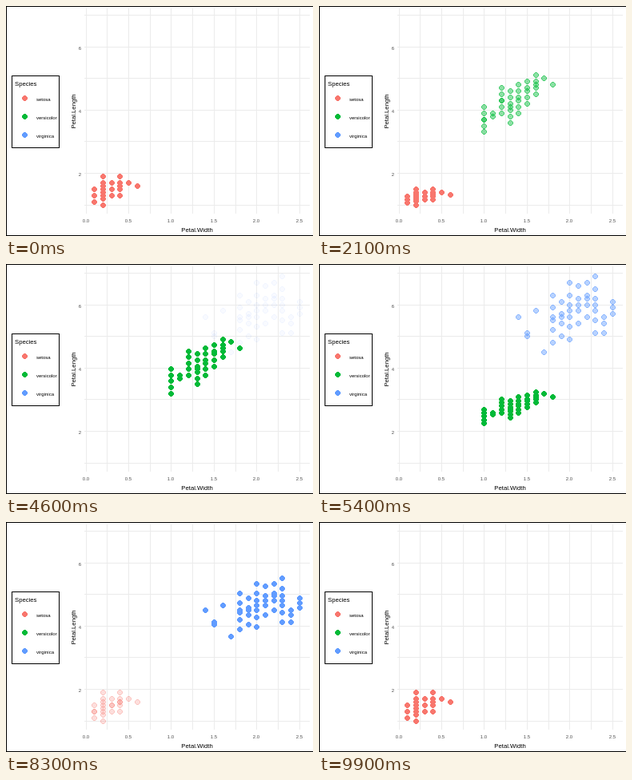
An HTML page with a canvas that plays this animation: 384x288 px, repeating every 10 s.

```html
<!DOCTYPE html>
<html lang="en">
<head>
<meta charset="utf-8">
<title>Iris petals by species</title>
<style>
  html, body { margin: 0; width: 100%; height: 100%; overflow: hidden; background: #fff; }
  canvas, svg { position: absolute; left: 0; top: 0; width: 384px; height: 288px; }
  text { font: 6px "Liberation Sans", Arial, sans-serif; }
  .title { font-size: 7.7px; }
  .tick { fill: #4d4d4d; }
</style>
</head>
<body>
<canvas id="plot" width="384" height="288"></canvas>
<svg id="labels" viewBox="0 0 384 288">
  <text class="title" x="239" y="283" text-anchor="middle">Petal.Width</text>
  <text class="title" transform="translate(87 132) rotate(-90)" text-anchor="middle">Petal.Length</text>
  <text class="title" x="11" y="100">Species</text>
</svg>
<script>
const ctx = document.getElementById('plot').getContext('2d');
const labels = document.getElementById('labels');
const LOOP = 10000, FRAME = 100, BASE = 1;

// The outline of each cloud: shortest and longest petal (mm) for each width,
// widths rising by 1 mm from `first`. `gap` is the usual distance between dots.
const species = [
  { name: 'setosa', color: '#F8766D', first: 1, gap: 1.4,
    spans: [[11, 15], [10, 19], [13, 17], [13, 19], [17, 17], [16, 16]] },
  { name: 'versicolor', color: '#00BA38', first: 10, gap: 1.8,
    spans: [[33, 41], [38, 39], [39, 47], [36, 46], [39, 48], [42, 49], [45, 51], [50, 50], [48, 48]] },
  { name: 'virginica', color: '#619CFF', first: 14, gap: 3,
    spans: [[56, 56], [50, 51], [58, 58], [45, 45], [48, 63], [50, 61],
            [49, 67], [54, 66], [56, 67], [51, 69], [51, 56], [57, 61]] }
];

// Fills a span with whole lengths that crowd towards its middle.
function spread([low, high], gap) {
  const steps = Math.ceil((high - low) / gap);
  return Array.from({ length: steps + 1 }, (_, i) => {
    const u = steps ? i / steps : 0;
    return Math.round(low + (high - low) * (u + 0.08 * Math.sin(2 * Math.PI * u)));
  });
}

for (const s of species) {
  s.points = s.spans.flatMap((span, i) =>
    spread(span, s.gap).map(length => ({ width: (s.first + i) / 10, length: length / 10 })));
}

// Each transition maps its step number to progress 0..1.
const transitions = [
  { start: 1200, progress: k => k / 22 },
  { start: 4600, progress: k => (k < 9 ? 1 + (k - 1) * 9 / 8 : k + 1) / 22 },
  { start: 7900, progress: k => k / 21 }
];

const xOf = width => Math.floor(100 + 106.95 * width);
const yOf = length => Math.floor(209.4 - 39.6 * (length - 2));

function addText(content, x, y, anchor, className = '') {
  const el = document.createElementNS('http://www.w3.org/2000/svg', 'text');
  el.setAttribute('x', x);
  el.setAttribute('y', y);
  el.setAttribute('text-anchor', anchor);
  el.setAttribute('class', className);
  el.textContent = content;
  labels.append(el);
}

for (let w = 0; w <= 2.5; w += 0.5) addText(w.toFixed(1), xOf(w), 271, 'middle', 'tick');
for (const l of [2, 4, 6]) addText(l, 94, yOf(l) + 3.5, 'end', 'tick');
species.forEach((s, i) => addText(s.name, 38, 119 + 23 * i, 'start'));

// A disc of whole pixels, without smoothed edges.
function addDisc(x, y, r) {
  for (let dy = -r; dy <= r; dy++) {
    const half = Math.min(r, r + 1 - Math.abs(dy));
    ctx.rect(x - half, y + dy, 2 * half + 1, 1);
  }
}

// Fill and outline overlap, so translucent dots show a darker rim.
function dot(x, y) {
  ctx.beginPath();
  addDisc(x, y, 3);
  ctx.fill();
  addDisc(x, y, 2);
  ctx.fill('evenodd');
}

function setColor(color, alpha = 1) {
  ctx.fillStyle = color;
  ctx.globalAlpha = alpha;
}

function drawBackground() {
  setColor('#fff');
  ctx.fillRect(0, 0, 384, 288);
  setColor('#ebebeb');
  for (let w = 0; w <= 2.5; w += 0.25) ctx.fillRect(xOf(w), 3, 1, 257);
  for (let l = 1; l <= 7; l++) ctx.fillRect(98, yOf(l), 282, 1);
  ctx.strokeRect(0.5, 0.5, 384, 287);
  ctx.strokeRect(7.5, 87.5, 59, 90);
  species.forEach((s, i) => {
    setColor(s.color);
    dot(23, 115 + 23 * i);
  });
}

function drawSpecies({ color, points }, scale, alpha) {
  setColor(color, alpha);
  for (const { width, length } of points) {
    dot(xOf(width), yOf(BASE + (length - BASE) * scale));
  }
}

function draw(time) {
  const t = Math.floor(time % LOOP / FRAME) * FRAME;
  const index = transitions.findLastIndex(tr => t >= tr.start);
  drawBackground();
  if (index < 0) return drawSpecies(species[0], 1, 1);

  const { start, progress } = transitions[index];
  const p = Math.min(1, progress((t - start) / FRAME + 1));
  if (p < 1) drawSpecies(species[index], 1 - p, 1);
  // Fading in is cut short: full opacity from halfway on.
  drawSpecies(species[(index + 1) % 3], 1, p < 0.5 ? p : 1);
}

const origin = performance.now();
function tick() {
  draw(performance.now() - origin);
  requestAnimationFrame(tick);
}
tick();
</script>
</body>
</html>
```
